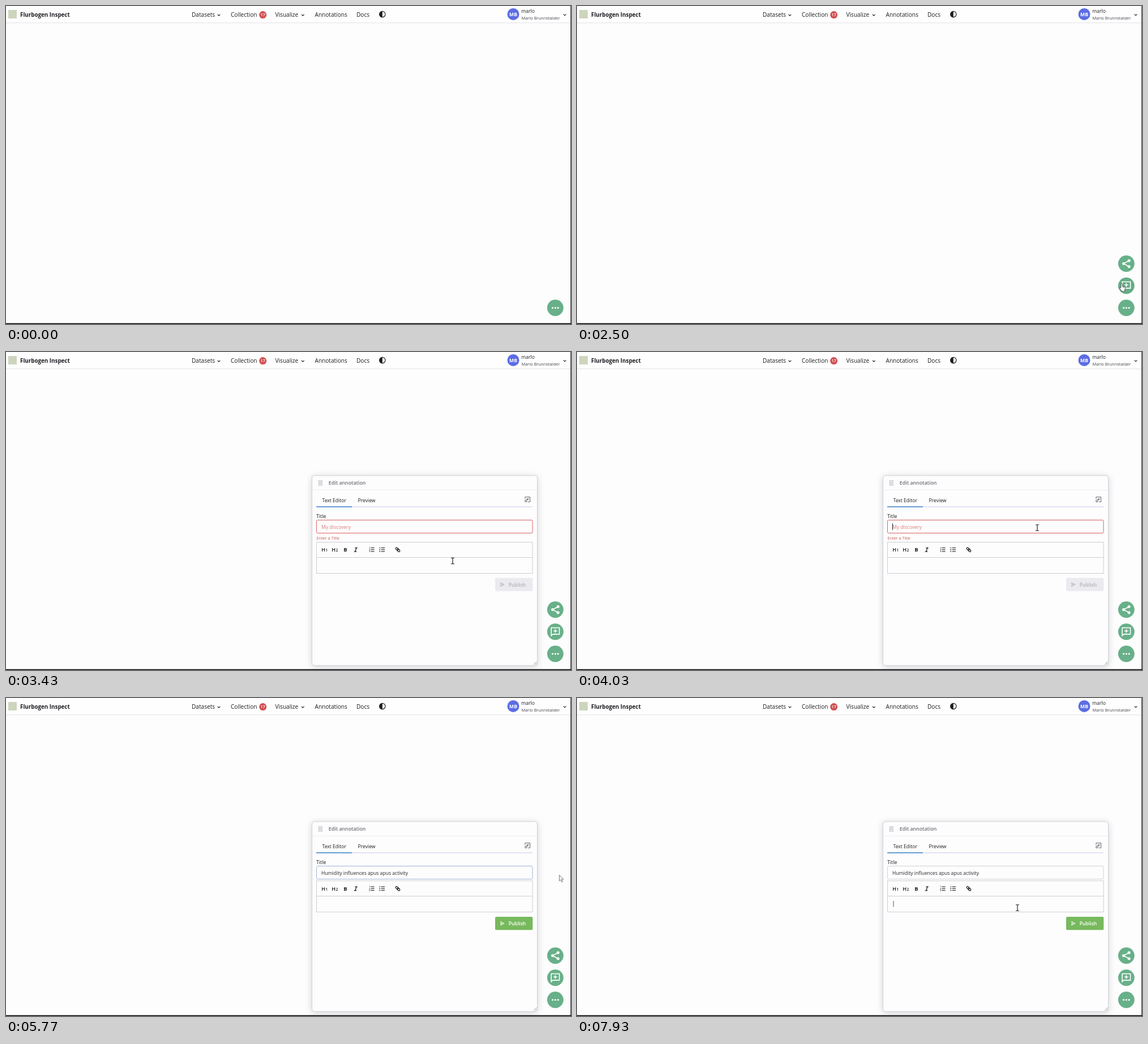
An HTML page with a canvas for the animation above (8 s loop, 998 by 561 pixels).

```html
<!DOCTYPE html>
<html lang="en">
<head>
<meta charset="utf-8">
<title>Annotation editor</title>
<style>
html, body { margin: 0; width: 100%; height: 100%; overflow: hidden; background: #fdfdfd; }
canvas { display: block; width: 998px; height: 561px; }
</style>
</head>
<body>
<canvas id="stage"></canvas>
<script>
const W = 998, H = 561, LOOP = 8000;
const FONT = '"Open Sans", "Noto Sans", sans-serif';
const canvas = document.getElementById('stage');
const c = canvas.getContext('2d');
const dpr = window.devicePixelRatio || 1;
canvas.width = Math.round(W * dpr);
canvas.height = Math.round(H * dpr);

const INK = '#1d1e22';
const RED = [214, 98, 96], BLUE = [92, 137, 212], GREY = [208, 209, 216];
const FAB = [104, 176, 137], FAB_DARK = [80, 153, 110];
const SHOW = 1330, OPEN = 1370, PANEL = 2900, FOCUS = 4000, PASTE = 4530, BLUR = 5600, EDIT = 7920;
const TITLE = 'Humidity influences apus apus activity';

// Pointer keys: time, x, y
const PATH = [
  [1330, 970, 534], [1530, 970, 534], [1690, 962, 520], [1830, 956, 515], [2000, 932, 500],
  [2150, 915, 490], [2220, 916, 487], [2420, 942, 477], [2600, 980, 507], [2730, 979, 500],
  [3030, 979, 500], [3290, 838, 404], [3430, 789, 368.5], [3560, 790, 346], [3710, 807, 325],
  [3940, 813, 310], [4690, 813, 310], [4800, 977, 312], [6770, 977, 312], [6960, 942, 434],
  [7090, 880, 455], [7300, 806, 396], [7530, 776, 318], [7670, 776, 318], [7740, 777, 307],
  [7920, 778, 370], [8000, 778, 370]
];

const clamp = v => Math.max(0, Math.min(1, v));
const ramp = (t, start, len) => { const k = clamp((t - start) / len); return k * k * (3 - 2 * k); };
const mix = (a, b, k) => `rgb(${a.map((v, i) => Math.round(v + (b[i] - v) * k)).join(',')})`;

function slope(i, d) {
  const a = PATH[i - 1], p = PATH[i], b = PATH[i + 1];
  if (!a || !b) return 0;
  const u = p[d] - a[d], v = b[d] - p[d];
  return u * v <= 0 ? 0 : (u + v) / (b[0] - a[0]);
}

function pointer(t) {
  let i = 0;
  while (i < PATH.length - 2 && t >= PATH[i + 1][0]) i++;
  const p = PATH[i], q = PATH[i + 1], h = q[0] - p[0], s = clamp((t - p[0]) / h);
  const at = d => {
    const a = s * s * (3 - 2 * s), s1 = s - 1;
    return p[d] + (q[d] - p[d]) * a + h * (s * s1 * s1 * slope(i, d) + s * s * s1 * slope(i + 1, d));
  };
  return [at(1), at(2)];
}

const onFab = ([x, y], fy) => Math.hypot(x - 970.3, y - fy) < 14.5;

// Share of the last 120 ms spent over a button
function hover(t, fy) {
  let n = 0;
  for (let i = 0; i < 8; i++) {
    const s = t - i * 15;
    if (s >= SHOW && onFab(pointer(s), fy)) n++;
  }
  return n / 8;
}

function text(str, x, y, size, color = INK, weight = 400, align = 'left') {
  c.font = `${weight} ${size}px ${FONT}`;
  c.fillStyle = color;
  c.textAlign = align;
  c.fillText(str, x, y);
}

function line(pts, color, width = 1, close = false) {
  c.beginPath();
  pts.forEach(([x, y]) => c.lineTo(x, y));
  if (close) c.closePath();
  c.strokeStyle = color;
  c.lineWidth = width;
  c.stroke();
}

function box(x, y, w, h, color) {
  c.fillStyle = color;
  c.fillRect(x, y, w, h);
}

function round(x, y, w, h, r, fill, stroke) {
  c.beginPath();
  c.roundRect(x, y, w, h, r);
  if (fill) { c.fillStyle = fill; c.fill(); }
  if (stroke) { c.strokeStyle = stroke; c.lineWidth = 1; c.stroke(); }
}

function disc(x, y, r, color) {
  c.beginPath();
  c.arc(x, y, r, 0, 7);
  c.fillStyle = color;
  c.fill();
}

const chevron = (x, y) => line([[x - 2.3, y - 1.2], [x, y + 1.2], [x + 2.3, y - 1.2]], INK, 1.1);

function header() {
  box(0, 0, W, 29, '#fefefe');
  box(0, 29, W, 1, '#e9e9ee');
  box(0, 30, W, 1, '#f6f6f9');
  box(4, 7, 15, 15, '#cdd5bd');
  text('Flurbogen Inspect', 25, 18.6, 9.8, INK, 700);
  [['Datasets', 328], ['Collection', 397], ['Visualize', 475.5], ['Annotations', 545.5], ['Docs', 619]]
    .forEach(([s, x]) => text(s, x, 18.6, 10.1, INK, 500));
  chevron(376, 16);
  chevron(524.3, 16);
  chevron(987, 15.6);
  disc(453.7, 15.6, 6.5, '#d25053');
  text('17', 453.7, 18.3, 7.2, '#fff', 600, 'center');
  c.beginPath();
  c.arc(664.8, 14.6, 5.2, 0, 7);
  c.strokeStyle = INK;
  c.lineWidth = 1.2;
  c.stroke();
  c.beginPath();
  c.arc(664.8, 14.6, 5.2, Math.PI / 2, Math.PI * 1.5);
  c.fillStyle = INK;
  c.fill();
  disc(896, 14.4, 10.5, '#5c6de3');
  text('MB', 896, 17.7, 8.6, '#fff', 700, 'center');
  text('marlo', 910.3, 12, 8.6, INK, 500);
  text('Marlo Brunnstalder', 910.5, 24.3, 7.45, '#45474d');
}

function toolbar(y) {
  const heading = (x, n) => {
    text('H', x - 5.8, y + 3.3, 9, INK, 600);
    text(n, x + 1.5, y + 3.3, 6.6, INK, 600);
  };
  heading(563, '1');
  heading(581, '2');
  text('B', 599.5, y + 3.4, 9.5, INK, 700, 'center');
  line([[616.4, y - 3.2], [620.8, y - 3.2]], INK, 1.3);
  line([[618.9, y - 3.2], [616.9, y + 3.4]], INK, 1.3);
  line([[614.8, y + 3.4], [619.2, y + 3.4]], INK, 1.3);
  for (let i = -1; i < 2; i++) {
    const r = y + i * 3.2;
    line([[644.4, r], [650.6, r]], INK, 1.1);
    line([[662.6, r], [669, r]], INK, 1.1);
    text(i + 2, 642.2, r + 1.4, 3.6, INK, 600, 'center');
    disc(660.2, r, 0.85, INK);
  }
  c.save();
  c.translate(692, y);
  c.rotate(Math.PI / 4);
  c.strokeStyle = INK;
  c.lineWidth = 1.25;
  [-4.6, -0.9].forEach(x => {
    c.beginPath();
    c.roundRect(x, -1.7, 5.5, 3.4, 1.7);
    c.stroke();
  });
  c.restore();
}

// The shadow is kept outside the panel so that it does not show through during the fade
function shadow() {
  c.save();
  c.beginPath();
  c.rect(0, 0, W, H);
  c.roundRect(540.5, 218, 398, 335, 4);
  c.clip('evenodd');
  c.shadowColor = 'rgba(40,45,70,.22)';
  c.shadowBlur = 12 * dpr;
  c.shadowOffsetY = 2 * dpr;
  round(540.5, 218, 398, 335, 4, '#fdfdfd');
  c.restore();
}

function panel(t) {
  const filled = t >= PASTE, off = filled ? 0 : 12.5;
  c.globalAlpha = clamp((t - PANEL + 5) / 210);
  shadow();
  round(540.5, 218, 398, 335, 4, '#fdfdfd', '#cfd0d8');

  for (let i = 0; i < 12; i++)
    box(552 + i % 3 * 2.6, 226.6 + Math.floor(i / 3) * 2.5, 1.3, 1.3, '#82848d');
  text('Edit annotation', 569.8, 234, 8.8, '#6d6f78', 600);
  box(541, 243, 397, 1, '#eeeff5');

  text('Text Editor', 558.5, 265.4, 8.6);
  text('Preview', 621.5, 265.4, 8.6);
  box(548, 272.3, 382, 1.7, '#dddef4');
  box(548, 272.3, 63, 1.7, '#5590cf');

  const ic = '#62646c';
  line([[916.9, 259], [916.9, 255.8], [925.6, 255.8], [925.6, 264.4], [922, 264.4]], ic, 1);
  line([[916.9, 261.2], [916.9, 264.4], [919.9, 264.4], [919.9, 261.2]], ic, 1, true);
  line([[924, 257.4], [920.6, 260.6]], ic, 1);
  line([[920.6, 258], [920.6, 260.6], [923.2, 260.6]], ic, 1);

  text('Title', 548, 292.8, 8.8, INK, 500);
  let edge;
  if (t < PASTE) edge = mix(RED, [205, 66, 66], ramp(t, FOCUS, 200));
  else if (t < BLUR) edge = mix(RED, BLUE, ramp(t, PASTE, 120));
  else edge = mix(BLUE, GREY, ramp(t, BLUR, 300));
  round(548.5, 296.5, 381.5, 23, 2, '#fdfdfd', edge);
  if (filled) text(TITLE, 557, 311.7, 8.6, '#26272c');
  else {
    text('My discovery', 557, 311.7, 8.6, '#dc7c7a');
    text('Enter a Title', 548.4, 331, 7.3, '#cc5a58');
  }
  if (t >= FOCUS + 30 && t < PASTE) box(557, 302.5, 1, 11.5, INK);
  if (filled && t < 5030) {
    c.font = `400 8.6px ${FONT}`;
    box(557.3 + c.measureText(TITLE).width, 302.5, 1, 11.8, INK);
  }

  const top = Math.floor(322.5 + off) + .5, mid = Math.floor(349.5 + off) + .5, end = Math.floor(377.7 + off) + .5;
  c.strokeStyle = '#cdced5';
  c.lineWidth = 1;
  c.strokeRect(548.5, top, 381.5, end - top);
  line([[548.5, mid], [930, mid]], '#cdced5');
  toolbar(336.2 + off);
  if (t >= EDIT) box(558.5, 358, 1, 10.5, '#55575e');

  const by = 386 + off, ready = ramp(t, PASTE - 30, 150);
  const ink = mix([177, 178, 184], [255, 255, 255], ready);
  round(864, by, 66.3, 23.3, 2, mix([235, 235, 239], [119, 185, 93], ready));
  line([[873.6, by + 8.5], [880, by + 11.7], [873.6, by + 14.9], [874.4, by + 11.7]], ink, 1, true);
  line([[874.4, by + 11.7], [877.4, by + 11.7]], ink, .9);
  text('Publish', 887.8, by + 15, 8.6, ink, 600);

  line([[932, 551.5], [937.5, 546]], '#8b8d94', .9);
  line([[935, 551.5], [937.5, 549]], '#8b8d94', .9);
  c.globalAlpha = 1;
}

function fab(t, y, icon, k = 1) {
  if (k <= 0) return;
  c.save();
  c.globalAlpha = k;
  c.translate(970.3, y);
  c.scale(.6 + .4 * k, .6 + .4 * k);
  disc(0, 0, 14.4, mix(FAB, FAB_DARK, hover(t, y)));
  icon();
  c.restore();
}

function share() {
  line([[4.8, -5.3], [-4.8, 0], [4.8, 5.3]], '#fff', 1.6);
  disc(4.8, -5.3, 2.5, '#fff');
  disc(-4.8, 0, 2.5, '#fff');
  disc(4.8, 5.3, 2.5, '#fff');
}

function note() {
  line([[-7.2, -7], [7.2, -7], [7.2, 4.4], [-4.6, 4.4], [-7.2, 6.8]], '#fff', 1.6, true);
  line([[0, -4.6], [0, 2]], '#fff', 1.6);
  line([[-3.3, -1.3], [3.3, -1.3]], '#fff', 1.6);
}

function dots() {
  [-4.8, 0, 4.8].forEach(x => disc(x, 0, 1.6, '#fff'));
}

function shape(d, fill, stroke) {
  const p = new Path2D(d);
  c.fillStyle = fill;
  c.fill(p);
  c.strokeStyle = stroke;
  c.lineWidth = .9;
  c.stroke(p);
}

function cursor(t) {
  if (t < SHOW) return;
  const p = pointer(t), [x, y] = p, open = t > OPEN + 100;
  const off = t < PASTE ? 12.5 : 0;
  const field = t > PANEL + 60 && x > 548 && x < 930 &&
    (y > 296 && y < 320 || y > 349.5 + off && y < 378 + off);
  c.save();
  c.translate(x, y);
  if (onFab(p, 532.5) || open && (onFab(p, 493.5) || onFab(p, 454.5))) {
    shape('M-1.2 .4Q0-.9 1 .4V5L5 5.8Q6.6 6.2 6.4 8L5.6 11.4V13.8H-.6V12L-3.8 8.3Q-4.4 6.9-3 6.8L-1.2 8.2Z', '#fff', '#4b4d52');
    line([[2.6, 5.4], [2.6, 7.4]], '#4b4d52', .7);
    line([[4.4, 5.8], [4.4, 7.6]], '#4b4d52', .7);
  } else if (field) {
    line([[-3, -5.2], [-.7, -5.2], [0, -4.6], [.7, -5.2], [3, -5.2]], '#222', 1.1);
    line([[0, -4.6], [0, 4.6]], '#222', 1.2);
    line([[-3, 5.2], [-.7, 5.2], [0, 4.6], [.7, 5.2], [3, 5.2]], '#222', 1.1);
  } else {
    shape('M.4 .4V10.8L2.8 8.6L4.5 12.5L6.3 11.7L4.6 7.9H7.8Z', '#fff', '#65676d');
  }
  c.restore();
}

function draw(now) {
  const t = now % LOOP;
  c.setTransform(dpr, 0, 0, dpr, 0, 0);
  box(0, 0, W, H, '#fdfdfd');
  header();
  if (t >= PANEL) panel(t);
  const k = ramp(t, OPEN, 220);
  fab(t, 454.5, share, k);
  fab(t, 493.5, note, k);
  fab(t, 532.5, dots);
  box(997, 0, 1, H, '#3a3a3c');
  box(0, 559.6, W, 1.4, '#000');
  cursor(t);
}

let start;
function tick(now) {
  if (start === undefined) start = now;
  draw(now - start);
  requestAnimationFrame(tick);
}
draw(0);
requestAnimationFrame(tick);
</script>
</body>
</html>
```
